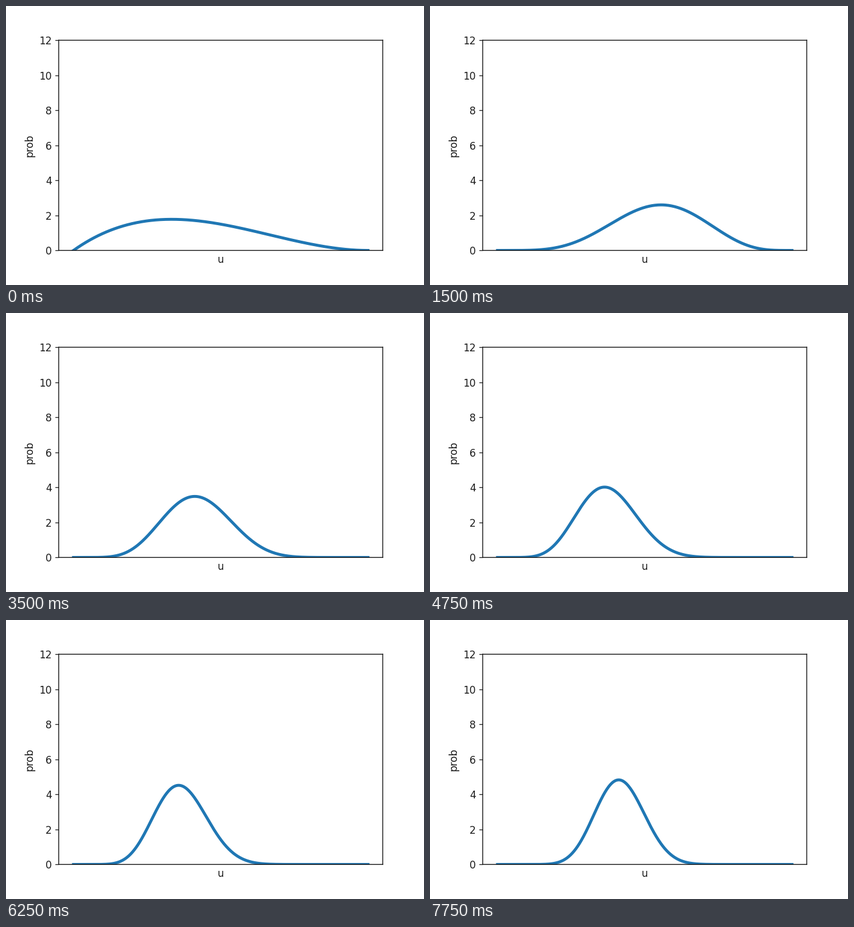
Animation, 699 px wide and 466 px high, one loop 8000 ms. Source, as a matplotlib script:

```python
import math

import numpy as np
import matplotlib.pyplot as plt
from matplotlib.animation import FuncAnimation

W, H = 699, 466
LEFT, RIGHT, TOP, BOTTOM = 88.2, 630.0, 57.2, 408.3
INK = "#1c1c1c"

# One coin flip per step: S raises alpha, F raises beta.
FLIPS = "SFSFSSFSFSFFFFSFFFFFSFFSFSFSSSF"
START = (2, 3)

plt.rcParams.update({
    "font.family": "DejaVu Sans",
    "font.size": 10.4,
    "text.color": INK,
    "axes.labelcolor": INK,
    "axes.edgecolor": INK,
    "axes.linewidth": 0.9,
    "xtick.color": INK,
    "ytick.color": INK,
})

u = np.linspace(0, 1, 500)


def beta_pdf(x, a, b):
    scale = math.exp(math.lgamma(a + b) - math.lgamma(a) - math.lgamma(b))
    return scale * x ** (a - 1) * (1 - x) ** (b - 1)


def posterior(step):
    seen = FLIPS[:step]
    return START[0] + seen.count("S"), START[1] + seen.count("F")


fig = plt.figure(figsize=(6, 4), dpi=W / 6, facecolor="white")
ax = fig.add_axes([LEFT / W, 1 - BOTTOM / H, (RIGHT - LEFT) / W, (BOTTOM - TOP) / H])
ax.set_xlim(-0.05, 1.05)
ax.set_ylim(0, 12)
ax.set_xticks([])
ax.set_yticks(range(0, 13, 2))
ax.set_xlabel("u", labelpad=4.2)
ax.set_ylabel("prob", labelpad=4.4)
for spine in ax.spines.values():
    spine.set_snap(False)

curve, = ax.plot(u, beta_pdf(u, *START), color="#1f77b4", linewidth=3)


def update(step):
    curve.set_ydata(beta_pdf(u, *posterior(step)))
    return curve,


anim = FuncAnimation(fig, update, frames=len(FLIPS) + 1, interval=250,
                     repeat=True, repeat_delay=0, blit=False)
plt.show()
```
